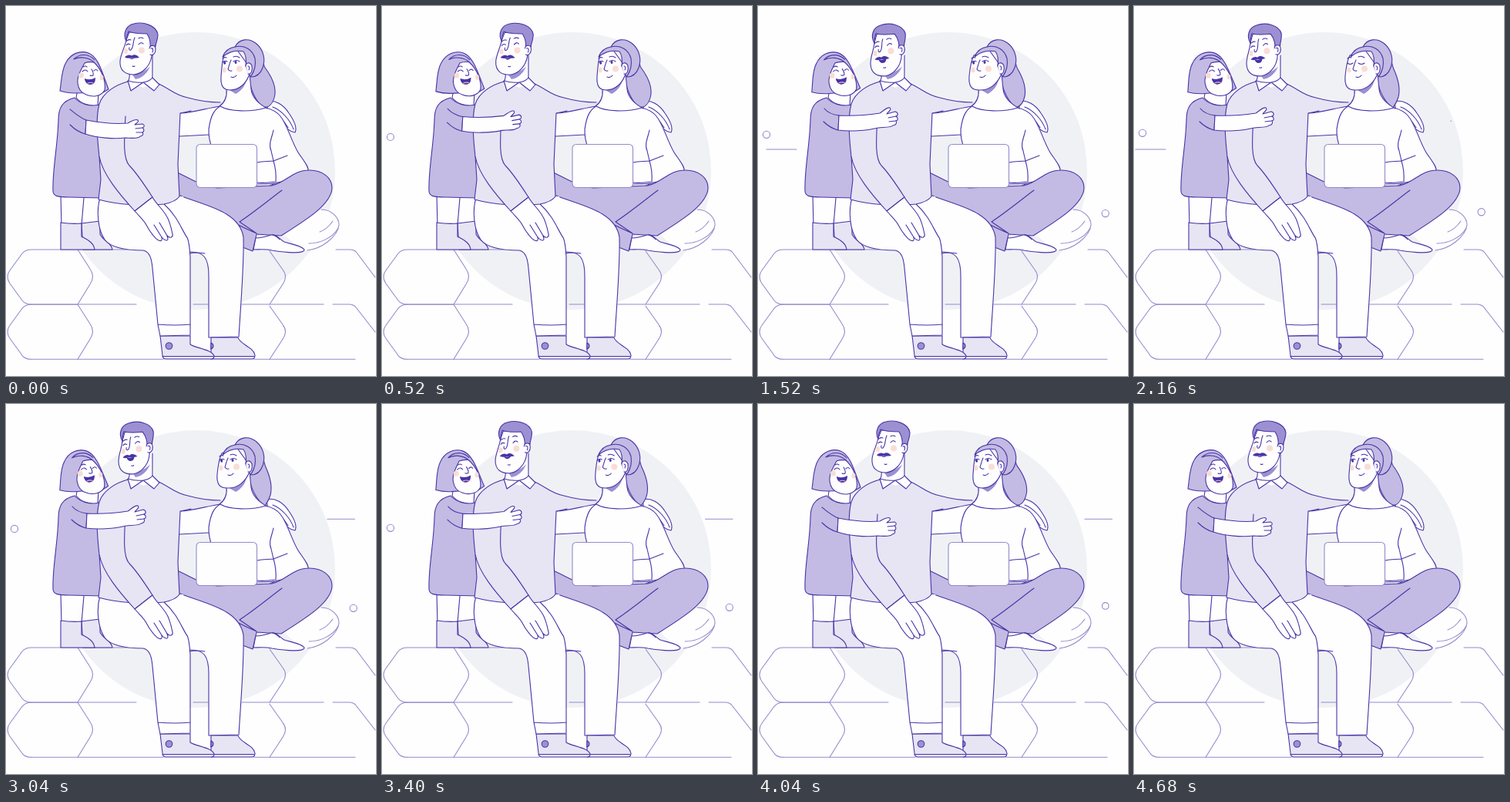
An HTML page that plays this animation: 480 by 480 pixels, repeating every 4760 ms.

```html
<!DOCTYPE html>
<html lang="en">
<head>
<meta charset="utf-8">
<title>Family on a bench</title>
<style>
html, body { margin: 0; width: 100%; height: 100%; overflow: hidden; background: #fefeff; }
svg { display: block; width: 100%; height: 100%; }
.ln { fill: none; stroke: #4834a6; stroke-width: 1.1; stroke-linecap: round; stroke-linejoin: round; }
.w { fill: #fefeff; }
.p { fill: #c3bbe3; }
.s { fill: #e7e4f3; }
.h { fill: #9c90d2; }
.d { fill: #4834a6; stroke: none; }
.k { fill: #f9ddd5; stroke: none; }
.thin { fill: none; stroke: #948bcb; stroke-width: 1.1; stroke-linecap: round; stroke-linejoin: round; }
.no { stroke: none; }
</style>
</head>
<body>
<svg viewBox="0 0 480 480">
<circle cx="247" cy="214" r="180" fill="#f0f1f5"/>

<g class="thin">
  <g id="cell">
    <path d="M93 316H33Q25 316 21 321L5 343Q-1 351 5 360L21 382Q25 387 33 387M93 316L109 341Q116 351 109 361L93 387M342 318L359 342Q366 351 359 361L342 387"/>
  </g>
  <use href="#cell" y="71.3"/>
  <path d="M93 316H186M33 387H169M243 387H262M306 387H412M424 387H445Q451 387 454 391L479 423M428 316H446Q452 316 455 320L479 352M33 458.3H204M322 458.3H453"/>
  <path class="w no" d="M409 264L360 296L385 318L400 314L420 290Z"/>
  <path class="w" d="M409 264C423 264 432 275 432 284C430 300 409 315 391 317"/>
  <path d="M431 288C424 301 407 308 393 308M424 279C419 286 413 291 407 293"/>
</g>
<g class="thin">
  <circle id="dotL" cx="11"/>
  <circle id="dotR" cx="450.7"/>
  <path id="lineL"/>
  <path id="lineR"/>
</g>

<!-- seated woman -->
<g class="ln">
  <path class="w" d="M338 124C349 121 360 128 367 139C374 149 378 158 375 164C368 163 361 157 356 149L340 138Z"/>
  <path d="M346 131C357 135 369 148 373 160M343 136C352 139 362 151 366 158"/>
  <path class="w no" d="M224 139L280 129L266 168L224 169Z"/>
  <path d="M225 169Q245 168 263 167"/>
  <path class="s no" d="M220 118C245 123 268 125 285 124L279 130C262 132 244 138 222 139Z"/>
  <path d="M279 130C262 132 244 138 226 139"/>
  <path class="w" d="M278 130C269 135 266 144 264 154C262 162 263 171 266 181L264 234H340L352 229C370 226 388 223 392 215C394 209 384 198 379 190C370 175 365 154 356 143C352 138 345 134 337 132Z"/>
  <path d="M347 161C345 171 340 179 344 188L347 201M326 203C334 201 340 202 347 201L365 194M347 201Q351 214 350 228M326 229C334 230 342 229 350 228"/>
  <path class="p" d="M222 216C242 225 252 233 274 236L345 233C365 228 371 213 394 213C411 213 423 223 423 236C422 257 392 276 357 298L325 296L320 318L307 313L220 250Z"/>
  <path d="M358 239C343 250 324 266 303 280M303 280L325 295M284 274C298 283 311 289 325 295"/>
  <path class="w" d="M324 301C331 301 338 299 344 297C352 296 355 303 361 306C370 309 384 311 387 316C387 322 363 320 345 317C337 315 329 316 321 316Z"/>
  <path d="M346 297Q352 299 355 303M326 231Q342 231 348 230"/>
  <rect x="247" y="179.500" width="78.500" height="56" rx="5" class="w" stroke="#948bcb"/>
</g>

<!-- woman's head -->
<g class="ln">
  <path id="tail" class="p"/>
  <path class="w no" d="M286 105L286 119L277 130C289 140 324 141 339 133C326 126 319 117 318 108L316 84Z"/>
  <path d="M286 108C287 118 284 125 277 130M316 88L318 108C319 117 326 126 339 133M278 130C289 137 318 138 337 132"/>
  <path class="h no" d="M288 108C298 109 306 104 312 95C311 104 304 111 298 114Z"/>
  <path id="face" class="w"/>
  <g id="look">
    <circle class="k" cx="303" cy="81.500" r="4"/>
    <ellipse class="k" cx="283" cy="83" rx="2.500" ry="3.500"/>
    <path d="M292 70C290 74 289 79 288 82Q290 85 293 84M292 92Q296 94 299 90M281 68Q283 66 286 67M295 66Q299 64 303 67"/>
    <g id="open">
      <path d="M281 73Q284 70 287 72M295 72Q299 69 303 72"/>
      <ellipse class="d" cx="283.700" cy="73.800" rx="1.500" ry="2"/>
      <ellipse class="d" cx="298" cy="73" rx="1.500" ry="2"/>
    </g>
    <path id="shut" d="M281 74Q284 77 288 74M295 74Q299 77 303 74"/>
  </g>
  <path class="p" d="M281 66C284 58 290 54 297 53C303 42 315 41 325 49C334 57 337 69 333 80C330 88 325 92 318 92L315 88L311 78C312 70 311 63 308 59C298 57 288 60 281 66Z"/>
  <path class="w" d="M311 78C311 73 317 72 319 78C320 84 318 89 314 88"/>
  <path d="M297 53C310 50 320 57 323 68Q325 80 318 91M314 78Q317 79 315 83"/>
</g>

<!-- girl's body -->
<g class="ln">
  <path class="w" d="M71 244L72 286H140V244Z"/>
  <path d="M101 249L98 284"/>
  <path class="s" d="M98 282L122 279L122 296C126 305 137 307 138 316H100Z"/>
  <path class="s" d="M71 281Q85 283 98 282V299C103 302 114 306 115 316H71Z"/>
  <path class="w" d="M93 108L91 119C97 127 111 131 119 129L120 112Z"/>
  <path class="p" d="M89 119C73 123 68 132 68 148C67 182 60 213 61 240C61 247 68 248 82 248L124 249L135 200L121 128C109 131 96 127 89 119Z"/>
</g>

<!-- man's body -->
<g class="ln">
  <path class="w" d="M200 250L226 246C258 259 303 266 308 300C309 335 305 380 302 429L263 430L263 350C263 327 257 318 237 319Z"/>
  <path class="s" d="M266 430H301C303 439 321 442 323 453Q323 458 319 458H266Z"/>
  <path d="M266 454.500H322"/>
  <path class="h" d="M266 437A4.200 4.200 0 0 1 266 445Z"/>
  <path class="s" d="M200 428H239V439C246 444 266 445 270 454Q270 458 266 458H208Q203 458 203 453Z"/>
  <path d="M203 454.500H269"/>
  <circle class="h" cx="211.500" cy="441" r="4.300"/>
  <path class="w no" d="M122 247C117 265 119 290 128 303C137 315 160 317 178 317C187 319 189 329 190 340L197 413L200 428L239 427L239 325C238 310 237 302 234 299L230 247Z"/>
  <path d="M122 249C117 265 119 290 128 303C137 315 160 317 178 317C187 319 189 329 190 340L197 413L200 428L239 427L239 325C238 310 237 302 234 299C228 290 222 272 205 257M197 413Q219 415 239 413M238 321Q247 319 258 321"/>
  <path class="w no" d="M160 84L158 99L178 106L192 97L190 60Z"/>
  <path class="s no" d="M158 98C143 102 126 112 121 127C117 142 118 170 121 195L123 225L120 251C145 258 180 260 205 257Q220 254 225 247L223 205L226 139L240 136V120C218 117 210 107 199 101L178 106Z"/>
  <path d="M158 98C143 102 126 112 121 127C117 142 118 170 121 195L123 225L120 251C145 258 180 260 205 257Q220 254 225 247L223 205L226 139Q232 138 240 136M198 101C212 107 219 116 236 119C250 123 264 125 278 125"/>
  <path class="s" d="M121 195C125 218 147 244 167 266L190 248C181 234 170 217 160 207C152 198 153 177 155 143"/>
  <path class="w" d="M167 266C175 275 179 278 182 284C187 294 195 303 198 304C202 306 203 303 202 300C206 305 210 305 210 302L209 298C213 302 217 300 216 296C214 286 212 278 208 272C202 262 195 257 190 248Z"/>
  <path d="M192 284L202 300M199 281L209 298"/>
  <path d="M160 87Q161 94 158 98M190 64L190 94"/>
  <path class="h no" d="M163 88C174 88 182 84 187 78C184 87 176 94 168 95Z"/>
  <path class="w" d="M158 97L162 110L178 99Q168 100 158 97ZM190 93L199 102L192 110L178 99Q186 98 190 93Z"/>
</g>

<!-- girl's arm -->
<g class="ln">
  <path id="sleeve" class="p"/>
  <path id="arm" class="w"/>
  <path id="fingers"/>
</g>

<!-- girl's head -->
<g id="girl" class="ln">
  <path class="p" d="M70 110C72 97 72 82 78 73C84 62 96 57 107 61C120 66 125 87 133 108L126 112L90 113Q79 113 70 110Z"/>
  <path class="w" d="M102 74C97 83 92 92 93 100C94 108 98 113 104 115C113 119 124 117 128 109C130 98 124 82 114 73Q107 72 102 74Z"/>
  <path d="M88 69C96 61 108 62 115 70M88 69C97 65 108 67 114 73"/>
  <circle class="k" cx="97.500" cy="90" r="3.500"/>
  <ellipse class="k" cx="124" cy="93" rx="2.500" ry="3.500"/>
  <path d="M99 85Q103 81 106 85M114 84Q117 81 119 84M111 82Q114 87 113 90Q111 91 109 90M100 79Q103 77 105 79"/>
  <path class="d" d="M102 94Q109 97 116 93C116 99 114 102 109 102C105 102 102 98 102 94Z"/>
  <path d="M106 100Q110 98.500 113 100" stroke="#f0b9c6"/>
</g>

<!-- man's head -->
<g id="man" class="ln">
  <path class="w" d="M156 44C154 54 149 62 148 71C147 84 155 89 166 89C177 88 187 78 189 65L194 52L190 34L160 34Z"/>
  <circle class="k" cx="176" cy="57.500" r="4"/>
  <ellipse class="k" cx="155.500" cy="58.500" rx="2.500" ry="3.500"/>
  <path d="M167 41C164 48 166 53 162 57Q159 58 160 54M156 51Q158 48 161 50M172 50Q175 46 178 49M157 45Q160 43 162 44M172 42Q175 40 178 42M164 78Q166 79 167 78"/>
  <path class="h" d="M156 46C151 35 156 25 166 23C178 20 195 25 197 37C197 44 194 49 193 55L187 54C188 47 186 41 183 36C175 36 166 36 159 33Q156 39 156 46Z"/>
  <path class="w" d="M186 55C187 50 194 50 194 56C194 62 190 65 187 63"/>
  <path d="M188 55Q192 54 190 60"/>
  <path id="mouth" class="d"/>
  <path class="d" d="M154 66.500C157 63 161 63 163 64.500C167 62 170 64 173 67C169 67.500 165 68 163 67C160 68 157 68 154 66.500Z"/>
</g>
</svg>
<script>
const LOOP = 4760;
const el = {};
document.querySelectorAll("[id]").forEach(n => el[n.id] = n);
const set = (n, k, v) => el[n].setAttribute(k, v);

const lin = (t, a, b) => Math.min(1, Math.max(0, (t - a) / (b - a)));
const ease = (t, a, b) => { const u = lin(t, a, b); return u * u * (3 - 2 * u); };
// rises over a..b, falls back over c..d
const swing = (t, a, b, c, d) => ease(t, a, b) - ease(t, c, d);
const num = /-?[\d.]+/g;
const mix = (from, to, p) => {
  const n = to.match(num);
  let i = 0;
  return from.replace(num, v => (+v + (n[i++] - v) * p).toFixed(2));
};

const poses = {
  sleeve: ["M83 134C89 139 96 145 104 148L103 166C95 164 88 159 83 154",
           "M86 133C91 139 97 141 105 142L104 161C96 159 90 155 85 150"],
  arm: ["M104 148C125 152 145 153 158 152C162 150 168 146 171 148C173 150 169 152 167 154L177 153C180 154 180 157 177 158C180 160 179 163 177 164C179 166 177 169 174 169C172 173 160 171 155 171C140 173 118 171 103 166Z",
        "M105 142C125 143 145 141 158 139C163 136 167 131 171 132C174 134 169 137 167 140L178 137C182 138 182 142 179 143C182 145 182 148 179 149C181 152 178 155 175 155C173 158 160 157 156 158C140 162 118 163 104 161Z"],
  fingers: ["M168 159L177 158M169 164L177 164", "M169 145L179 143M170 150L179 149"],
  tail: ["M319 50C336 57 331 71 336 80C342 88 350 100 349 114C347 127 341 132 334 131C325 125 317 110 315 92Z",
         "M319 50C336 57 332 71 337 82C342 93 346 106 343 118C341 125 338 129 336 132C326 126 317 110 315 92Z"],
  face: ["M283 64C280 72 280 80 279 91C278 104 282 109 291 109C303 109 312 100 316 88L312 74L299 56Z",
         "M280 64C276 72 275 80 274 91C273 104 277 109 287 109C301 110 311 100 316 88L312 74L299 56Z"],
  mouth: ["M160 67Q163 68 168 67Q165 69 163 69Q161 69 160 67Z",
          "M159 67Q163 68 169 67Q168 72 164 72Q160 72 159 67Z"]
};
const pose = (n, p) => set(n, "d", mix(...poses[n], p));

const dot = (n, y, r) => {
  set(n, "cy", y);
  set(n, "r", r);
  set(n, "visibility", r > 0.1 ? "visible" : "hidden");
};
const line = (n, a, b, y) => set(n, "d", Math.abs(b - a) > 0.1 ? `M${a} ${y}H${b}` : "");

function draw(t) {
  const nod = swing(t, 300, 1240, 3080, 3680);
  set("man", "transform", `rotate(${-6 * nod} 182 92)`);
  pose("mouth", nod);

  set("girl", "transform", `rotate(${-3 * swing(t, 40, 1000, 3200, 4100)} 103 115)`);
  const reach = swing(t, 40, 760, 3320, 4040);
  ["sleeve", "arm", "fingers"].forEach(n => pose(n, reach));

  const turn = swing(t, 1000, 1500, 3100, 3650);
  pose("face", turn);
  set("look", "transform", `translate(${-4 * turn} 0)`);
  pose("tail", swing(t, 1000, 2100, 3200, 4200));
  const shut = [840, 2160].some(c => Math.abs(t - c) <= 90);
  set("open", "visibility", shut ? "hidden" : "visible");
  set("shut", "visibility", shut ? "visible" : "hidden");

  dot("dotL", 171.7 - 0.0032 * t, 4.6 * swing(t, 160, 560, 3680, 3920));
  dot("dotR", 273.3 - 0.0028 * t, 4.6 * swing(t, 660, 1080, 3980, 4400));

  const x = 32.4 - 0.0141 * t, r = 395.6 + 0.007 * t;
  line("lineL", x + 39 * (1 - ease(t, 1160, 1500)), x + 39 * (1 - ease(t, 2500, 2940)), 186);
  line("lineR", r + 35.5 * ease(t, 4300, 4660), r + 35.5 * ease(t, 2110, 2640), 149.2);
}

const start = performance.now();
function frame() {
  draw((performance.now() - start) % LOOP);
  requestAnimationFrame(frame);
}
frame();
</script>
</body>
</html>
```
